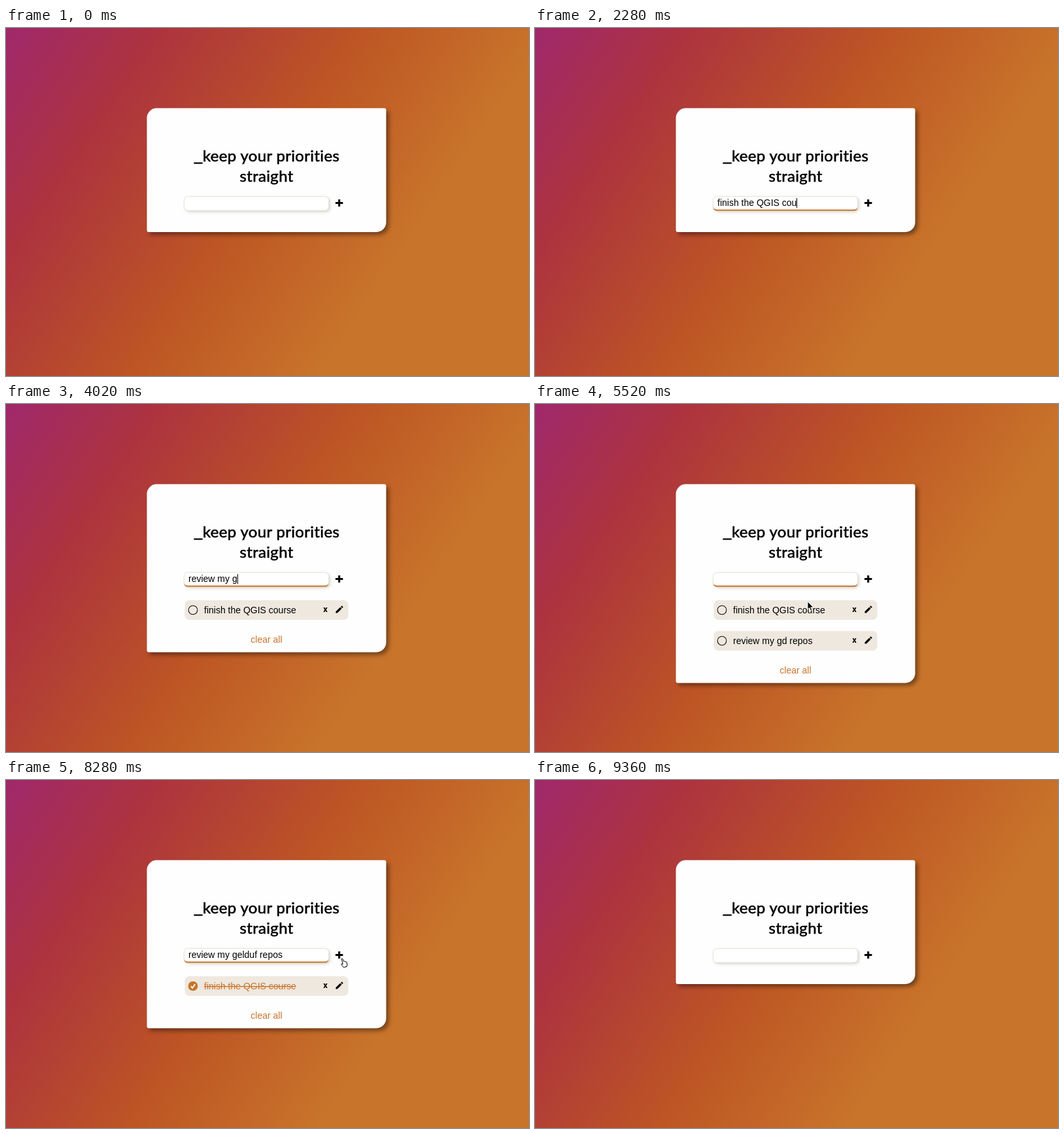
These frames come from a looping animation (800x532 px, 9780 ms). An HTML page:

```html
<!DOCTYPE html>
<html lang="en">
<head>
<meta charset="utf-8">
<title>Priorities</title>
<style>
html, body { margin: 0; width: 100%; height: 100%; overflow: hidden; }
body { background: linear-gradient(124deg, #a0286c 0%, #ac333f 20%, #bd5524 47%, #c8742b 72%); }
svg { display: block; width: 800px; height: 532px; }
text { font: 14px "Liberation Sans", Arial, sans-serif; white-space: pre; }
.title { font: 24px Lato, sans-serif; letter-spacing: .32px; stroke: #000; stroke-width: .55px; }
.title.bar { font: 22px "Liberation Sans", sans-serif; }
.x { font: bold 13px Roboto, sans-serif; }
#card { fill: #fefefe; filter: drop-shadow(4px 4px 3px rgba(0, 0, 0, .42)); }
#field { fill: #fff; stroke: #e6e5d6; filter: drop-shadow(2px 2px 2px rgba(60, 60, 30, .2)); }
.row { fill: #eee8df; }
.ring { fill: none; stroke: #111; stroke-width: 1.1px; }
.accent { fill: #c8742b; }
.tick { fill: none; stroke: #fff; stroke-width: 1.9px; }
.done text.label { fill: #c8742b; text-decoration: line-through; }
.done .ring { fill: #c8742b; stroke: #c8742b; }
.item:not(.done) .tick { display: none; }
</style>
</head>
<body>
<svg viewBox="0 0 800 532">
  <path id="card"/>
  <text class="title bar" x="288" y="202.6">_</text>
  <text class="title" x="301" y="204">keep your priorities</text>
  <text class="title" x="357.5" y="235">straight</text>
  <rect id="field" x="272.5" y="257.5" width="221" height="21.5" rx="6"/>
  <path id="focus" class="accent" d="M272.5 273.5q.6 4 6 4h209q5.400 0 6-4q0 6-6 6h-209q-6 0-6-6z"/>
  <text id="typed" x="279"></text>
  <rect id="caret" y="260" width="1" height="15"/>
  <path d="M504 267.500h11.400M509.700 262v11" fill="none" stroke="#000" stroke-width="3"/>
  <g id="list"></g>
  <text id="clear" class="accent" x="374.300">clear all</text>
  <g id="pointer">
    <path id="arrow" d="M0 0v12.200l2.800-2.600 1.900 4.300 2-.9-1.900-4.100h3.900z" stroke="#fff" stroke-width=".9"/>
    <path id="hand" d="M1.200 1.400q1.300-1 2 .3l1.300 3.600q1-.8 1.700.3 1-.6 1.600.4 1.200-.4 1.500.8l.6 3.300-.7 3.300-4.800 1-3.500-4.600q0-1.300 1.700-.6l.7.400z" fill="#fff" stroke="#000" stroke-linejoin="round"/>
    <path id="beam" d="M-2-6.500q2 0 2 1.500v10q0 1.500-2 1.500M2-6.500q-2 0-2 1.500v10q0 1.500 2 1.500" fill="none" stroke="#222"/>
  </g>
</svg>
<script>
const LOOP = 9780, STEP = 60, ROW = 47;
const el = id => document.getElementById(id);
const show = (node, on) => node.style.display = on ? '' : 'none';

// Value of the last [time, value] entry reached at t.
const at = (table, t) => table.filter(row => row[0] <= t).pop();

const keys = [[0, '']];
const put = (t, text) => keys.push([t, text]);
const type = (t, text, gap = STEP) => {
  for (const ch of text) { put(t, keys[keys.length - 1][1] + ch); t += gap; }
};
type(600, 'finish');
type(1080, ' the ');
type(1500, 'QGIS ', 120);
type(2160, 'course');
put(2640, '');
type(2880, 'review ', 120);
type(3720, 'my', 120);
type(3900, ' g');
type(4080, 'd');
type(4200, ' repos');
put(4740, '');
put(6600, 'review my gd repos');
put(7380, 'review my g repos');
[...'elduf'].forEach((ch, i, all) =>
  put(7500 + i * STEP, `review my g${all.slice(0, i + 1).join('')} repos`));
put(8340, '');

const counts = [[0, 0], [2640, 1], [4740, 2], [6600, 1], [8340, 2], [9120, 0]];
const focus = [[0, false], [420, true], [5940, false], [7260, true], [8340, false]];

// Pointer: time, x, y, shape
const moves = [
  [0, 562, 304, ''], [60, 562, 304, 'arrow'], [300, 492, 274, 'beam'], [420, 430, 268, 'beam'],
  [600, 430, 268, ''], [4980, 430, 268, 'beam'], [5220, 436, 281, 'arrow'],
  [5520, 417, 302, 'arrow'], [5820, 288, 314, 'hand'], [5940, 287, 315, 'hand'],
  [6120, 306, 321, 'arrow'], [6480, 508, 358, 'hand'], [6600, 506, 357, 'arrow'],
  [6780, 506, 357, 'arrow'], [7080, 400, 276, 'beam'], [7200, 361, 268, 'beam'],
  [7380, 361, 268, ''], [7860, 361, 268, 'beam'], [8040, 495, 270, 'arrow'],
  [8160, 512, 272, 'hand'], [8460, 512, 272, 'arrow'], [8880, 400, 402, 'hand'],
  [9120, 400, 402, 'arrow'], [9300, 406, 408, 'arrow'], [9360, 406, 408, '']
];

const itemMarkup = i => `<g class="item" transform="translate(0 ${i * ROW})">
  <rect class="row" x="273.500" y="300" width="250" height="30" rx="7"/>
  <circle class="ring" cx="286" cy="315" r="6.800"/>
  <path class="tick" d="M282.800 315.300l2.400 2.700 4-6"/>
  <text class="label" x="303" y="320"></text>
  <text class="x" x="485.200" y="318">x</text>
  <path transform="translate(502.600 306.600) scale(.62)" d="M3 17.250V21h3.750L17.800 9.940 14.060 6.190zM20.710 7.040a1 1 0 0 0 0-1.410l-2.340-2.340a1 1 0 0 0-1.410 0l-1.830 1.830 3.750 3.750z"/>
</g>`;
el('list').innerHTML = itemMarkup(0) + itemMarkup(1);
const items = [...document.querySelectorAll('.item')];
const labels = [...document.querySelectorAll('.label')];
labels[0].textContent = 'finish the QGIS course';

function drawCard(bottom) {
  el('card').setAttribute('d', `M230.500 122.500H578.500q3 0 3 3V${bottom - 15}
    a15 15 0 0 1-15 15H218.500q-3 0-3-3V137.500a15 15 0 0 1 15-15z`);
}

function drawPointer(t) {
  const from = at(moves, t);
  const to = moves[moves.indexOf(from) + 1] || from;
  const k = (t - from[0]) / (to[0] - from[0] || 1);
  const e = k * k * (3 - 2 * k);
  const mix = n => from[n] + (to[n] - from[n]) * e;
  el('pointer').setAttribute('transform', `translate(${mix(1)} ${mix(2)})`);
  for (const id of ['arrow', 'hand', 'beam']) show(el(id), from[3] === id);
}

function draw(t) {
  const n = at(counts, t)[1];
  const [focusTime, focused] = at(focus, t);
  const [keyTime, text] = at(keys, t);

  drawCard(n ? 332.5 + n * ROW : 312);
  items.forEach((item, i) => show(item, i < n));
  items[0].classList.toggle('done', t >= 5940);
  labels[1].textContent = t < 6600 ? 'review my gd repos' : 'review my gelduf repos';
  show(el('clear'), n);
  el('clear').setAttribute('y', 318 + n * ROW);

  const typed = el('typed');
  typed.textContent = text;
  typed.setAttribute('y', focused ? 272 : 272.8);
  show(el('focus'), focused);
  const blinkOn = (t - Math.max(keyTime, focusTime)) % 1000 < 500;
  show(el('caret'), focused && blinkOn);
  // While editing, the caret sits before the last word.
  const tail = t >= 7260 ? ' repos'.length : 0;
  const length = text.length - tail;
  const width = length > 0 ? typed.getSubStringLength(0, length) : 0;
  el('caret').setAttribute('x', Math.round(279 + width));

  drawPointer(t);
}

const start = performance.now();
function tick() {
  const t = (performance.now() - start) % LOOP;
  draw(Math.floor(t / STEP) * STEP);
  requestAnimationFrame(tick);
}
tick();
</script>
</body>
</html>
```
